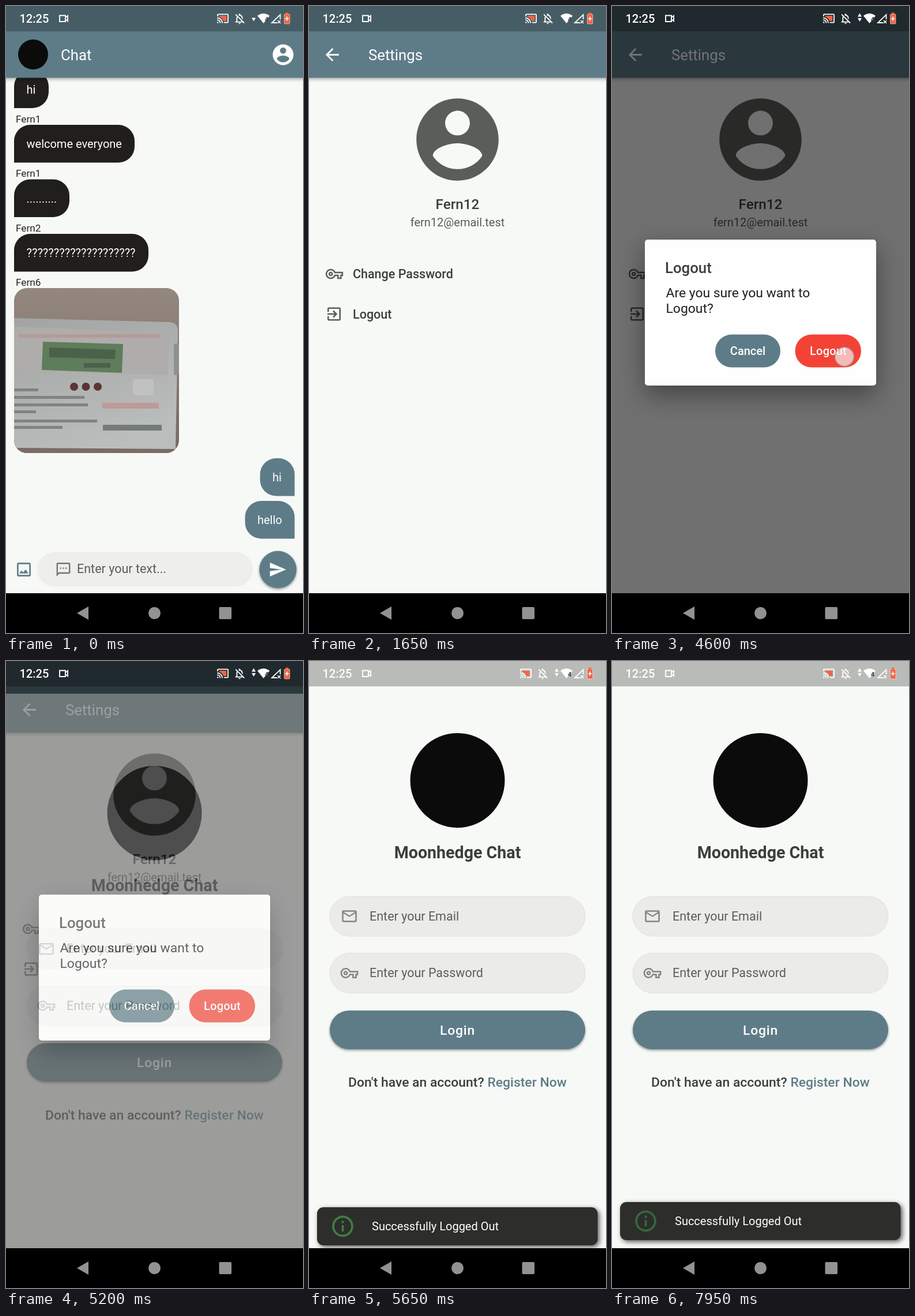
These frames come from a looping animation (515 by 1087 pixels, 8 s). An HTML page:

```html
<!DOCTYPE html>
<html lang="en">
<head>
<meta charset="utf-8">
<title>Chat logout</title>
<style>
  html, body { margin: 0; width: 100%; height: 100%; overflow: hidden; background: #000; }
  svg { display: block; font-family: Roboto, sans-serif; }
  text { white-space: pre; }
  .bar { filter: drop-shadow(0 2px 3px rgba(0,0,0,.35)); }
  .raised { filter: drop-shadow(0 2px 2px rgba(0,0,0,.4)); }
  .modal { filter: drop-shadow(0 16px 22px rgba(0,0,0,.4)); }
  .toast { filter: drop-shadow(3px 3px 4px rgba(0,0,0,.65)); }
</style>
</head>
<body>
<svg id="stage" width="515" height="1087" viewBox="0 0 515 1087"></svg>
<script>
const TEAL = '#5e7c87', PAGE = '#f7f9f6', INK = '#3c3e3b', GREY = '#5b5d5a', WHITE = '#fff';

const icons = {
  account: 'M12 2C6.48 2 2 6.48 2 12s4.48 10 10 10 10-4.48 10-10S17.52 2 12 2zm0 3c1.66 0 3 1.34 3 3s-1.34 3-3 3-3-1.34-3-3 1.34-3 3-3zm0 14.2c-2.5 0-4.71-1.28-6-3.22.03-1.99 4-3.08 6-3.08 1.99 0 5.97 1.09 6 3.08-1.29 1.94-3.5 3.22-6 3.22z',
  back: 'M20 11H7.83l5.59-5.59L12 4l-8 8 8 8 1.41-1.41L7.83 13H20v-2z',
  key: 'M22 19h-6v-4h-2.68c-1.14 2.42-3.6 4-6.32 4-3.86 0-7-3.14-7-7s3.14-7 7-7c2.72 0 5.17 1.58 6.32 4H24v6h-2v4zm-4-2h2v-4h2v-2H11.94l-.23-.67C11.01 8.34 9.11 7 7 7c-2.76 0-5 2.24-5 5s2.24 5 5 5c2.11 0 4.01-1.34 4.71-3.33l.23-.67H18v4zM7 15c-1.65 0-3-1.35-3-3s1.35-3 3-3 3 1.35 3 3-1.35 3-3 3zm0-4c-.55 0-1 .45-1 1s.45 1 1 1 1-.45 1-1-.45-1-1-1z',
  exit: 'M10.09 15.59L11.5 17l5-5-5-5-1.41 1.41L12.67 11H3v2h9.67l-2.58 2.59zM19 3H5c-1.11 0-2 .9-2 2v4h2V5h14v14H5v-4H3v4c0 1.1.89 2 2 2h14c1.1 0 2-.9 2-2V5c0-1.1-.9-2-2-2z',
  mail: 'M22 6c0-1.1-.9-2-2-2H4c-1.1 0-2 .9-2 2v12c0 1.1.9 2 2 2h16c1.1 0 2-.9 2-2V6zm-2 0l-8 5-8-5h16zm0 12H4V8l8 5 8-5v10z',
  info: 'M11 7h2v2h-2zm0 4h2v6h-2zm1-9C6.48 2 2 6.48 2 12s4.48 10 10 10 10-4.48 10-10S17.52 2 12 2zm0 18c-4.41 0-8-3.59-8-8s3.59-8 8-8 8 3.59 8 8-3.59 8-8 8z',
  picture: 'M19 5v14H5V5h14m0-2H5c-1.1 0-2 .9-2 2v14c0 1.1.9 2 2 2h14c1.1 0 2-.9 2-2V5c0-1.1-.9-2-2-2zm-4.86 8.86l-3 3.87L9 13.14 6 17h12l-3.86-5.14z',
  sms: 'M20 2H4c-1.1 0-2 .9-2 2v18l4-4h14c1.1 0 2-.9 2-2V4c0-1.1-.9-2-2-2zm0 14H5.17L4 17.17V4h16v12zM7 9h2v2H7zm4 0h2v2h-2zm4 0h2v2h-2z',
  send: 'M2.01 21L23 12 2.01 3 2 10l15 2-15 2z',
  cast: 'M21 3H3c-1.1 0-2 .9-2 2v3h2V5h18v14h-7v2h7c1.1 0 2-.9 2-2V5c0-1.1-.9-2-2-2zM1 18v3h3c0-1.66-1.34-3-3-3zm0-4v2c2.76 0 5 2.24 5 5h2c0-3.87-3.13-7-7-7zm0-4v2c4.97 0 9 4.03 9 9h2c0-6.08-4.93-11-11-11z',
  castFill: 'M5 7v1.63c3.96 1.28 7.09 4.41 8.37 8.37H19V7z',
  muted: 'M12 22c1.1 0 2-.9 2-2h-4c0 1.1.9 2 2 2zm0-15.5c2.49 0 4 2.02 4 4.5v.1l2 2V11c0-3.07-1.63-5.64-4.5-6.32V4c0-.83-.67-1.5-1.5-1.5s-1.5.67-1.5 1.5v.68c-.24.06-.47.15-.69.23l1.64 1.64c.18-.02.36-.05.55-.05zM5.41 3.35L4 4.76l2.81 2.81C6.29 8.57 6 9.74 6 11v5l-2 2v1h14.24l1.74 1.74 1.41-1.41L5.41 3.35zM16 17H8v-6c0-.68.12-1.32.34-1.9L16 16.76V17z'
};

const icon = (name, cx, cy, scale, fill) =>
  `<path d="${icons[name]}" fill="${fill}" transform="translate(${cx} ${cy}) scale(${scale}) translate(-12 -12)"/>`;
const text = (s, x, y, size, fill, weight = 400, anchor = 'start', extra = '') =>
  `<text x="${x}" y="${y}" font-size="${size}" fill="${fill}" font-weight="${weight}" text-anchor="${anchor}" ${extra}>${s}</text>`;
const rect = (x, y, w, h, fill, r = 0, extra = '') =>
  `<rect x="${x}" y="${y}" width="${w}" height="${h}" rx="${r}" fill="${fill}" ${extra}/>`;
const circle = (cx, cy, r, fill, extra = '') =>
  `<circle cx="${cx}" cy="${cy}" r="${r}" fill="${fill}" ${extra}/>`;
const page = rect(0, 0, 515, 1087, PAGE);
const appBar = rect(-10, -10, 535, 134.5, TEAL, 0, 'class="bar"');

// Rounded bubble with a square corner on the speaker's side.
function bubble(x, y, w, label, own) {
  const r = 28, h = 65.5;
  const corners = own
    ? `h${w - 2 * r}a${r} ${r} 0 0 1 ${r} ${r}v${h - r}h${r - w}a${r} ${r} 0 0 1 ${-r} ${-r}v${2 * r - h}a${r} ${r} 0 0 1 ${r} ${-r}z`
    : `h${w - 2 * r}a${r} ${r} 0 0 1 ${r} ${r}v${h - 2 * r}a${r} ${r} 0 0 1 ${-r} ${r}h${r - w}v${r - h}a${r} ${r} 0 0 1 ${r} ${-r}z`;
  return `<path d="M${x + r} ${y}${corners}" fill="${own ? TEAL : '#201f1d'}"/>` +
    text(label, x + 21.5, y + 40, 20, WHITE);
}

const photo = `
  <clipPath id="photoClip">${rect(14, 489, 286, 286, WHITE, 22)}</clipPath>
  <linearGradient id="wood" x2="0" y2="1"><stop stop-color="#94877f"/><stop offset="1" stop-color="#756a63"/></linearGradient>
  <linearGradient id="casing" x2=".4" y2="1"><stop stop-color="#a3a3a3"/><stop offset="1" stop-color="#b9bdbc"/></linearGradient>
  <g clip-path="url(#photoClip)">
    ${rect(14, 489, 286, 286, 'url(#wood)')}
    <path d="M14 541L285 548Q299 550 298 566L294 768L14 766z" fill="url(#casing)"/>
    <path d="M14 556L284 566L280 640L14 632z" fill="#aeadab"/>
    <path d="M14 768L300 770V775H14z" fill="#7d6c66"/>
    <path d="M64 582L203 586L201 636L62 631z" fill="#5f7c5b"/>
    <path d="M75 592L190 596L189 612L75 609z" fill="#4a6249"/>
    ${rect(135, 619, 46, 8, '#4a6249')}
    ${rect(291, 585, 9, 55, '#8f9190', 4)}
    ${rect(220, 647, 36, 28, '#c0c1c0', 4)}
    ${[118, 138.5, 159].map(x => circle(x, 660, 7, '#5b3532')).join('')}
    ${rect(22, 569, 245, 6, '#b69a97')}
    ${rect(167, 688, 98, 10, '#bd9a98')}
    ${[[663, 42], [676, 122], [689, 128], [701, 38], [717, 144], [728, 84]].map(([y, w]) => rect(14, y, w, 5, '#7f8384')).join('')}
    ${rect(168, 726, 102, 10, '#757a7b')}
  </g>`;

const chat = page +
  bubble(14, 111.5, 60, 'hi') +
  ['Fern1', 'Fern1', 'Fern2', 'Fern6'].map((name, i) => text(name, 17, 202 + i * 94.3, 17.2, '#222')).join('') +
  bubble(14, 206, 209, 'welcome everyone') +
  bubble(14, 300.5, 96, '.'.repeat(10)) +
  bubble(14, 395, 233, '?'.repeat(20)) +
  photo +
  bubble(440.5, 784, 60, 'hi', true) + bubble(414.5, 858, 86, 'hello', true) +
  icon('picture', 31, 977, 1.33, TEAL) +
  rect(54, 947, 374, 59.5, '#eeeeec', 29.7) +
  icon('sms', 99.5, 977, 1.19, '#747673') + text('Enter your text...', 123, 983, 21.5, GREY) +
  circle(471.5, 977, 32.3, TEAL, 'class="raised"') + icon('send', 471, 977, 1.33, WHITE) +
  appBar + circle(47, 84, 26, '#0b0b0b') +
  text('Chat', 95, 94, 25.75, WHITE) + icon('account', 480.5, 84.5, 1.8, WHITE);

const settings = page + appBar +
  icon('back', 40.3, 84.5, 1.43, WHITE) + text('Settings', 103, 94, 25.75, WHITE) +
  icon('account', 257.5, 231.5, 7.13, GREY) +
  text('Fern12', 257.5, 352, 24.3, INK, 500, 'middle') +
  text('fern12@email.test', 257.5, 382, 20, GREY, 400, 'middle') +
  `<clipPath id="row">${rect(0, 499.5, 515, 70, WHITE)}</clipPath>
   <g id="ink" clip-path="url(#row)">${rect(0, 499, 515, 71, 'rgba(188,188,188,.4)')}
   ${circle(311, 533, 0, 'rgba(200,200,200,.4)', 'id="splash"')}</g>` +
  icon('key', 44, 464.5, 1.26, GREY) + text('Change Password', 76, 472, 21.5, INK, 500) +
  icon('exit', 43.5, 534, 1.28, GREY) + text('Logout', 76, 542, 21.5, INK, 500);

const dialog = rect(0, 0, 515, 1087, 'rgba(0,0,0,.55)') +
  rect(57, 405, 401, 253, '#fdfefd', 5, 'class="modal"') +
  text('Logout', 92, 463, 25.75, INK, 500) +
  text('Are you sure you want to', 93.5, 505, 22.9, '#1d1e1d') + text('Logout?', 93.5, 532, 22.9, '#1d1e1d') +
  rect(179, 569.5, 113, 57, TEAL, 28.5) + text('Cancel', 235.5, 605, 20, WHITE, 500, 'middle') +
  rect(317.5, 569.5, 114.5, 57, '#f44336', 28.5) +
  `<clipPath id="pill">${rect(317.5, 569.5, 114.5, 57, WHITE, 28.5)}</clipPath>
   <g clip-path="url(#pill)">${circle(403, 608, 0, WHITE, 'id="buttonSplash"')}</g>` +
  text('Logout', 375, 605, 20, WHITE, 500, 'middle', 'letter-spacing=".2"');

const field = (y, name, label) =>
  rect(36, y, 443, 69, '#ebecea', 34.5, 'stroke="#e0e1df"') +
  icon(name, 70, y + 34.5, 1.28, '#838582') + text(label, 105, y + 41.5, 21.5, GREY);

const login = page + circle(257.5, 207, 82, '#0b0b0b') +
  text('Moonhedge Chat', 257.5, 342, 28.6, INK, 700, 'middle') +
  field(408, 'mail', 'Enter your Email') + field(506.5, 'key', 'Enter your Password') +
  rect(36, 606, 443, 67, TEAL, 33.5, 'class="raised"') +
  text('Login', 257.5, 647.5, 22.9, WHITE, 500, 'middle', 'letter-spacing=".8"') +
  text("Don't have an account?", 68, 738, 22.9, INK, 500) + text('Register Now', 309.5, 738, 22.9, TEAL, 500);

const toast = rect(14, 0, 486.5, 66, '#2d2e2c', 11, 'class="toast"') +
  `<g id="pulse">${icon('info', 58.5, 33, 1.83, '#4caf50')}</g>` +
  text('Successfully Logged Out', 109, 40, 20, WHITE);

const status = rect(0, 0, 515, 44, 'rgba(0,0,0,.25)') +
  text('12:25', 23.5, 29, 20, WHITE, 500) +
  `<path d="M93 16.5h10v10.5h-10zM103 20l4-3v9l-4-3" fill="none" stroke="#fff" stroke-width="1.9"/>
   <g id="shifting">${icon('castFill', 376, 21.5, .9, '#f4633f') + icon('cast', 376, 21.5, .9, WHITE) + icon('muted', 405, 22, .93, WHITE)}</g>
   <path id="up" d="M426 18.5l3.5-6 3.5 6z" fill="#fff"/><path id="down" d="M426 21l3.5 6 3.5-6z" fill="#fff"/>
   <path d="M436 17q10.500-8 21 0l-10.500 13z" fill="#fff"/>
   <path d="M475.500 23V15L461 29h9" fill="none" stroke="#fff" stroke-width="1.800"/>
   <path d="M471 25l5 5m0-5l-5 5" stroke="#fff" stroke-width="1.500"/>` +
  text('4', 452, 27, 11, '#33464d', 700, 'middle') +
  rect(482.5, 14, 9.500, 17, '#f4633f', 1.500, 'stroke="#fff" stroke-opacity=".55"') + rect(485, 11.500, 4.500, 2.500, '#f4633f') +
  '<path d="M487.200 18.500v7m-3.200-3.500h6.500" stroke="#fff" stroke-width="1.700"/>';

const nav = rect(0, 1018, 515, 69, '#000') +
  `<path d="M123 1052.500L143 1041v23z" fill="#929292"/>` +
  circle(257.5, 1052.5, 10.5, '#929292') + rect(369.5, 1042, 21.5, 21, '#929292', 2);

const stage = document.getElementById('stage');
stage.innerHTML = Object.entries({ chat, settings, dialog, login, toast, status, nav })
  .map(([id, body]) => `<g id="${id}">${body}</g>`).join('') +
  circle(0, 0, 16, 'rgba(245,245,245,.68)', 'id="touch" stroke="rgba(150,180,195,.6)" stroke-width="2"');

const el = id => document.getElementById(id);
const set = (id, attrs) => { for (const k in attrs) el(id).setAttribute(k, attrs[k]); };
const progress = (t, start, length) => Math.min(1, Math.max(0, (t - start) / length));

function bezier(x1, y1, x2, y2) {
  const at = (a, b, s) => 3 * (1 - s) ** 2 * s * a + 3 * (1 - s) * s * s * b + s ** 3;
  return x => {
    let lo = 0, hi = 1;
    for (let i = 0; i < 24; i++) {
      const mid = (lo + hi) / 2;
      if (at(x1, x2, mid) < x) lo = mid; else hi = mid;
    }
    return at(y1, y2, lo);
  };
}
const fastOutSlowIn = bezier(.4, 0, .2, 1);
const easeIn = bezier(.42, 0, 1, 1);
const easeOut = bezier(0, 0, .58, 1);
const easeOutCirc = bezier(.075, .82, .165, 1);

// Page enters by rising a quarter of the screen while fading in.
function enter(id, t, start) {
  const p = progress(t, start, 300);
  set(id, { opacity: easeIn(p), transform: `translate(0 ${272 * (1 - fastOutSlowIn(p))})` });
}

const taps = [[800, 1000, 480, 85], [3200, 3650, 311, 533], [4600, 4750, 403, 608]];

function draw(t) {
  enter('settings', t, 1050);
  enter('login', t, 5046);
  set('dialog', { opacity: easeOut(progress(t, 3680, 300)) });

  set('ink', { opacity: progress(t, 3230, 150) * (1 - progress(t, 3650, 220)) });
  set('splash', { r: Math.min(313, .313 * Math.max(0, Math.min(t, 3650) - 3230) + 1.43 * Math.max(0, t - 3650)) });
  set('buttonSplash', { r: 110 * progress(t, 4620, 300), opacity: .24 * (1 - progress(t, 4750, 250)) });

  set('toast', { transform: `translate(0 ${938 + 469 * (1 - easeOutCirc(progress(t, 5024, 1000)))})` });
  const beat = Math.max(0, t - 5024) / 1000 % 2;
  set('pulse', { opacity: 1 - .6 * (beat < 1 ? beat : 2 - beat) });

  const down = t < 1000 || t >= 3750, up = t >= 3750;
  set('shifting', { transform: `translate(${down ? 0 : 9} 0)` });
  set('down', { opacity: +down, transform: `translate(0 ${up ? 0 : -.5})` });
  set('up', { opacity: +up });

  const tap = taps.find(([from, to]) => t >= from && t < to);
  set('touch', { opacity: tap ? 1 : 0, transform: tap ? `translate(${tap[2]} ${tap[3]})` : '' });
}

const origin = performance.now();
function tick() {
  const t = (performance.now() - origin) % 8000;
  draw(Math.floor(t / 50) * 50);
  requestAnimationFrame(tick);
}
tick();
</script>
</body>
</html>
```
